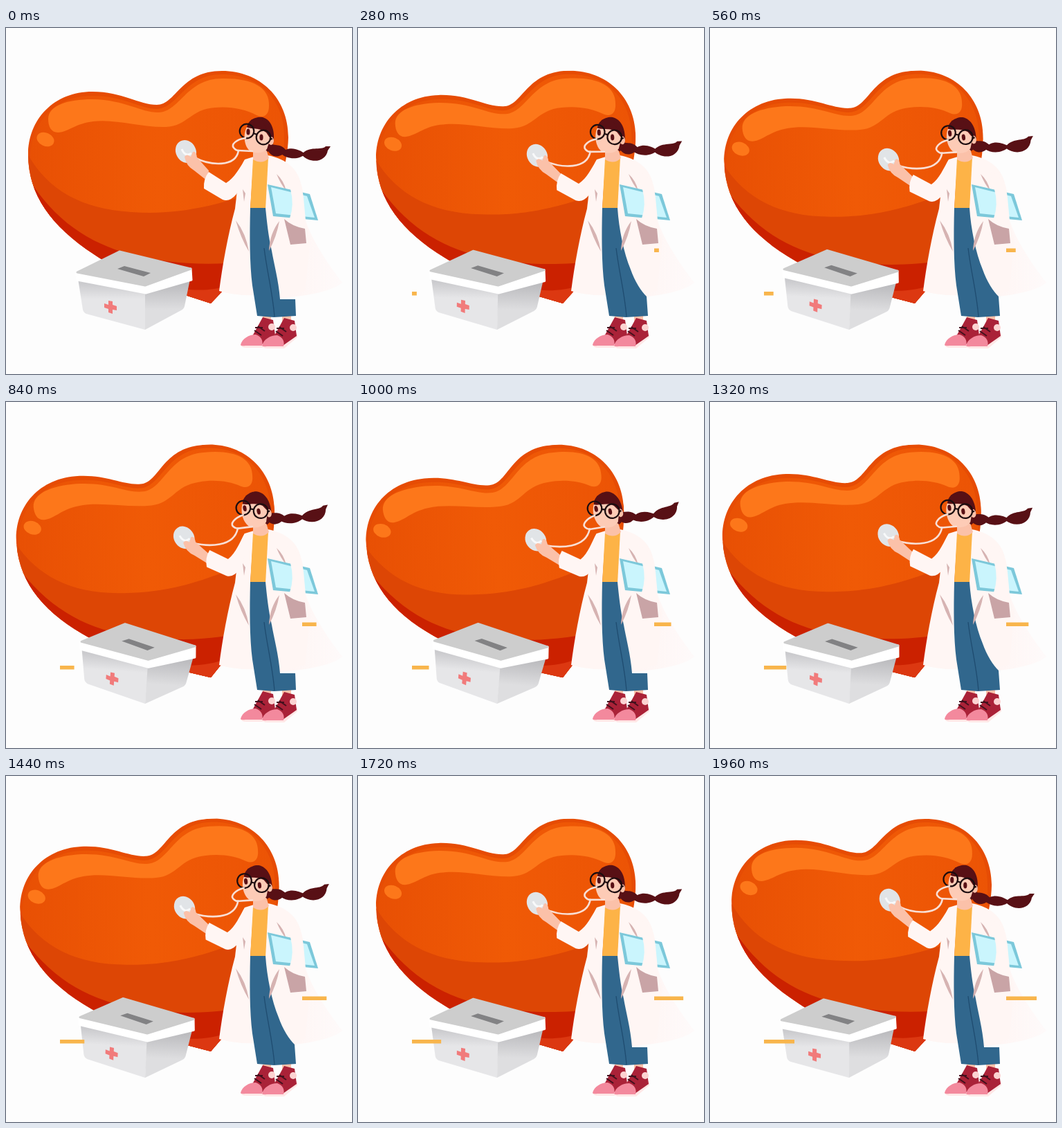
Write an HTML page that moves like this. It is 500 by 500 pixels and loops after 2 s.

```html
<!DOCTYPE html>
<html lang="en">
<head>
<meta charset="utf-8">
<title>Heart check-up</title>
<style>
  html, body { margin: 0; width: 100%; height: 100%; overflow: hidden; background: #fdfdfd; }
  svg { display: block; width: 100vw; height: 100vh; }
  .skin { fill: #fbc1a9; }
  .hair { fill: #581015; }
  .coat { fill: #fff6f4; }
  .fold { fill: #d6b3b2; }
  .tube { fill: none; stroke: #f9dfd5; stroke-width: 2.6; stroke-linecap: round; }
  .lens { fill: none; stroke: #1c0d10; stroke-width: 2.2; }
</style>
</head>
<body>
<svg viewBox="0 0 500 500">
  <defs>
    <linearGradient id="tail" x1="0" y1="0" x2="1" y2="0">
      <stop offset=".2" stop-color="#fff4f2"/><stop offset="1" stop-color="#fefafa"/>
    </linearGradient>
    <linearGradient id="body" x1="0" y1="0" x2="1" y2="0">
      <stop offset="0" stop-color="#e85004"/><stop offset=".5" stop-color="#f05a06"/><stop offset="1" stop-color="#ec5405"/>
    </linearGradient>
    <linearGradient id="front" x1="0" y1="0" x2="0" y2="1">
      <stop offset=".1" stop-color="#cbcbce"/><stop offset=".4" stop-color="#e6e6e8"/>
    </linearGradient>
    <linearGradient id="side" x1="0" y1="0" x2="0" y2="1">
      <stop offset=".1" stop-color="#bcbcbf"/><stop offset=".6" stop-color="#dedee0"/>
    </linearGradient>
    <clipPath id="heartShape"><path d="M218 111C246 111 252 62 312 62C367 62 408 101 408 158C406 240 346 332 314 379L296 398L262 387C210 370 160 350 127 327C66 287 32 241 32 183C32 132 69 92 125 92C168 92 192 111 218 111Z"/></clipPath>
  </defs>

  <g id="heart" clip-path="url(#heartShape)">
    <path fill="#e64c04" d="M0 40H430V420H0Z"/>
    <path fill="url(#body)" d="M36 200C30 135 75 97 125 98C170 98 194 117 218 117C249 116 258 67 312 67C368 67 403 106 402 158L402 290H36Z"/>
    <path fill="#fd771a" d="M61 131C62 112 88 103 125 103C174 104 196 123 221 122C251 121 261 73 312 73C354 72 382 85 380 113C380 126 372 131 362 126C345 117 324 113 302 115C267 117 262 142 231 143C197 144 158 131 126 135C100 138 91 150 75 151C65 151 61 142 61 131Z"/>
    <ellipse fill="#fd771a" cx="57" cy="161" rx="13" ry="9.5" transform="rotate(24 57 161)"/>
    <path fill="#dd4605" d="M30 180C58 232 107 262 181 266C243 270 302 262 410 218V420H20Z"/>
    <path fill="#cb2100" d="M25 205C64 274 116 310 180 327C232 340 282 344 350 338V420H25Z"/>
    <path fill="#dc3811" d="M250 376C276 380 296 380 330 371V420H250Z"/>
  </g>

  <path fill="url(#tail)" d="M375 200L431 270C437 300 466 342 486 368C472 380 438 387 398 390L360 386Z"/>

  <g id="box">
    <path fill="url(#front)" d="M104 362L202 381L201 436L116 413Q112 411 111 407Z"/>
    <path fill="url(#side)" d="M201 381L266 363L258 402Q257 406 253 408L201 436Z"/>
    <path fill="#fff" stroke="#fff" stroke-width="3" stroke-linejoin="round" d="M102 355L201 374L267 348L268 364L202 383L103 364Z"/>
    <path fill="#cdcdcd" stroke="#cdcdcd" stroke-width="3" stroke-linejoin="round" d="M103 353L164 323L267 348L201 372Z"/>
    <path fill="#828284" d="M161 348L171 344L209 354L199 359Z"/>
    <path fill="#f17b7b" d="M148 394L154 395V400L160 402V408L154 407V413L148 411V406L142 404V398L148 400Z"/>
  </g>

  <g id="feet">
    <path class="skin" d="M371 414H383V428H371ZM399 414H412V425H399Z"/>
    <g id="shoe">
      <path fill="#ffe7e6" d="M339 456Q338 462 348 462L371 462L390 446V440Z"/>
      <path fill="#aa2238" d="M371 418L386 422L389 444L369 458L355 447Z"/>
      <path fill="#f3899d" d="M339 458C341 449 351 443 361 443C369 446 372 452 370 459H346Q340 460 339 458Z"/>
      <circle fill="#fcd3d2" cx="384" cy="432" r="5"/>
      <path fill="none" stroke="#43101d" stroke-width="2" d="M359 437L369 444M364 431L374 438M360 433L371 433"/>
    </g>
    <use href="#shoe" x="31" y="1"/>
  </g>

  <path class="coat" d="M358 186L345 190C335 205 335 232 331 261C320 302 313 342 308 380Q330 387 358 386L353 340V262Z"/>
  <path class="coat" d="M378 184C400 188 416 199 423 215C431 235 432 258 432 280L440 306L432 380L398 389L383 320L374 262Z"/>
  <path fill="#fdb347" d="M357 189L379 187L375 262H353Z"/>
  <path id="pants" fill="#31678d"/>
  <path fill="none" stroke="#1f4c70" stroke-width="1.3" d="M373 318C377 352 385 380 388 417"/>
  <path class="fold" d="M332 278Q347 297 351 323Q339 303 332 278ZM342 233L346 239L344 251ZM395 279Q381 297 380 322Q391 302 395 279ZM391 211Q401 220 405 235Q397 226 391 211Z"/>
  <path fill="#c9a4a6" d="M402 276Q414 287 432 290L434 311L411 313Z"/>
  <path fill="#7cc8da" d="M378 226L439 240L451 278L386 272Z"/>
  <path fill="#caf5fd" d="M383 230L435 243L446 274L390 268Z"/>
  <path class="coat" d="M404 207C420 212 428 222 430 246L433 278Q422 286 410 275Q417 255 411 233Z"/>
  <path class="skin" d="M357 178L376 175L380 188Q370 198 357 190Z"/>

  <path id="cord" class="tube"/>
  <g id="hand">
    <ellipse fill="#e1e4e7" cx="260" cy="178.500" rx="14.500" ry="17" transform="rotate(-28 260 178.500)"/>
    <path fill="none" stroke="#f8f9fa" stroke-width="3" d="M254 175Q259 187 268 181"/>
    <path class="skin" d="M258 186Q261 181 267 186L270 179Q275 177 276 187L293 206L291 221L272 206Q260 199 258 186Z"/>
  </g>
  <path id="arm" class="coat" d="M346 190C337 202 331 216 318 224L293 208Q285 218 286 232L313 248Q323 252 333 240L351 207Z"/>

  <g id="head">
    <g id="braid" class="hair">
      <path d="M379 165C386 172 396 165 405 177C397 189 383 188 378 176Z"/>
      <path d="M397 181C409 169 423 175 433 182C423 191 406 190 397 181Z"/>
      <path d="M427 183C438 169 455 178 462 171L469 171L465 177C462 194 440 197 427 183Z"/>
    </g>
    <path class="hair" d="M348 147C347 133 362 127 371 129C384 133 388 148 387 161Q386 175 378 179Z"/>
    <path fill="#fdcbb6" d="M348 143C353 147 366 143 376 151L382 160L377 175Q370 183 355 179C344 174 342 154 348 143Z"/>
    <path class="hair" d="M348 144C355 137 366 137 383 157L377 147L370 132L355 132Z"/>
    <ellipse class="skin" cx="383" cy="163" rx="4" ry="6"/>
    <g class="hair">
      <ellipse cx="350" cy="150" rx="2.600" ry="4.500"/>
      <ellipse cx="369" cy="158" rx="2.600" ry="4.500"/>
    </g>
    <g class="lens">
      <circle cx="348" cy="149" r="10.300"/>
      <circle cx="372" cy="158" r="10.300"/>
      <path d="M357 152L363 154M381 161L385 160"/>
    </g>
    <path class="tube" d="M346 159C333 161 325 168 329 173Q332 177 336 177L356 178"/>
  </g>

  <g fill="#f8b54c">
    <rect id="dashLeft" x="78" y="381" height="5.500"/>
    <rect id="dashRight" x="428" y="318.500" height="5.500"/>
  </g>
</svg>
<script>
const LOOP = 2000, STEP = 40;
const $ = id => document.getElementById(id);
const set = (id, name, value) => $(id).setAttribute(name, value);
const turn = (id, angle, x, y, shift = '') =>
  set(id, 'transform', `${shift} rotate(${angle} ${x} ${y})`);

const pantsPath = edge =>
  `M353 260C352 300 352 340 356 372L363 416L387 418L419 416L${edge}375 260Z`;
const flared = pantsPath('417 388C409 380 400 366 394 349C384 325 377 290 ');
const stepped = pantsPath('418 392L396 392C394 365 387 340 384 322C379 300 377 280 ');

function draw(now) {
  const t = Math.floor(now % LOOP / STEP) * STEP;
  const p = 1 - Math.abs(t / 1000 - 1); // sways out, then back

  turn('heart', -5.65 * p, 298, 398);
  turn('box', 4.8 * p, 200, 436);
  turn('head', -12 * p, 368, 180);
  set('braid', 'transform', `translate(0 ${-6 * p})`);
  turn('arm', -7.8 * p, 345, 200);
  turn('hand', -7.8 * p, 345, 200, `translate(${-p} ${9 * p})`);
  set('cord', 'd', `M${272 - 3 * p} ${187 + 20 * p}C${295 - 3 * p} ${199 + 12 * p} ` +
    `${332 - 3 * p} ${202 + 10 * p} ${336 - 1.2 * p} ${177 + 6.5 * p}`);

  const beat = t % 1000;
  set('pants', 'd', beat < 120 || beat > 700 ? stepped : flared);

  const width = Math.min(44, t * .0245);
  set('dashLeft', 'width', width);
  set('dashRight', 'width', width);
}

const start = performance.now();
function tick() {
  draw(performance.now() - start);
  requestAnimationFrame(tick);
}
tick();
</script>
</body>
</html>
```
